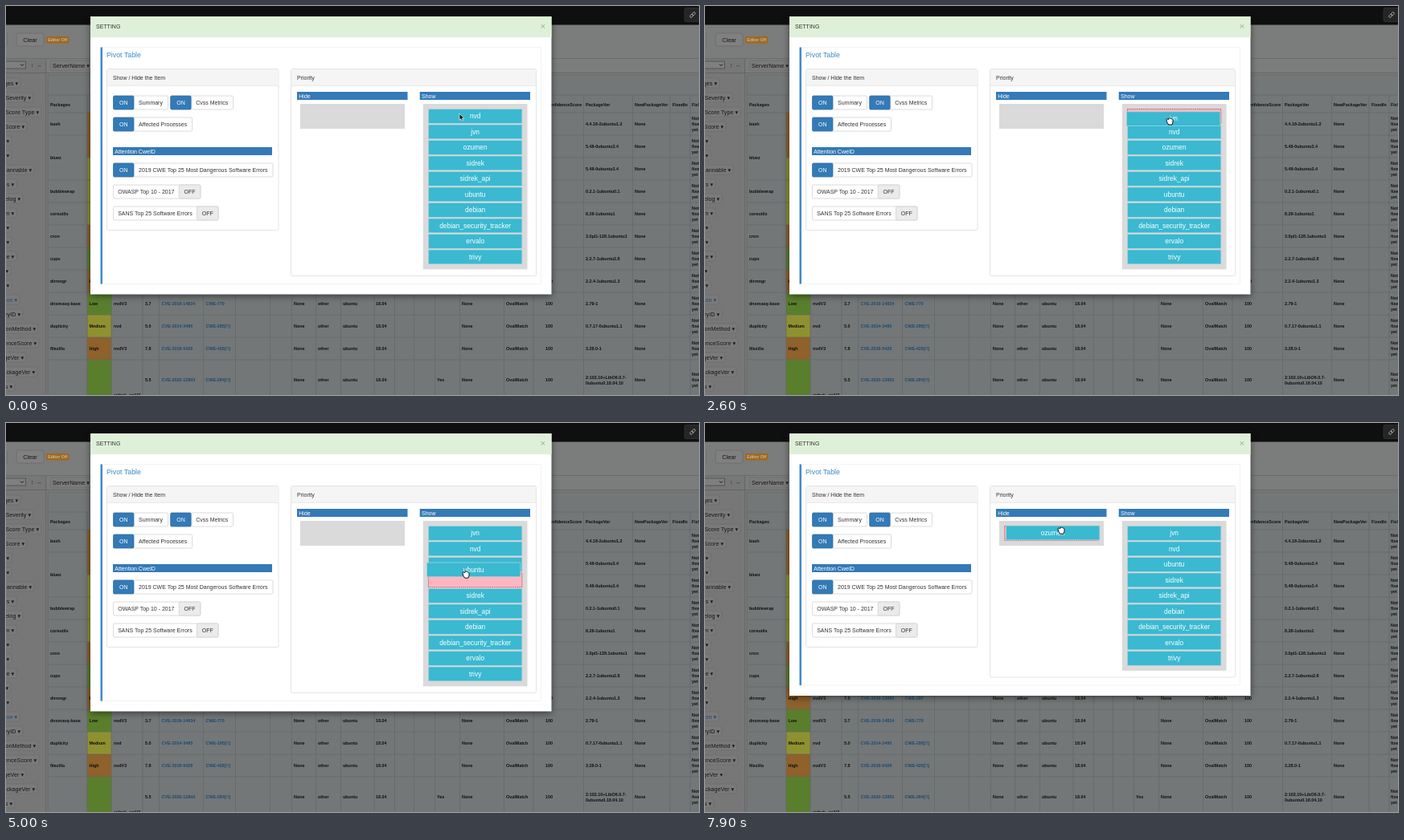
Write an HTML page that moves like this. It is 862 by 485 pixels and loops after 8000 ms.

```html
<!DOCTYPE html>
<html lang="en">
<head>
<meta charset="utf-8">
<title>Priority settings</title>
<style>
  html, body { margin: 0; width: 100%; height: 100%; overflow: hidden; background: #7f7f7f; }
  svg { display: block; width: 862px; height: 485px; font-family: "Liberation Sans", Arial, sans-serif; }
  text { white-space: pre; }
  .dialog { filter: drop-shadow(0 2px 4px rgba(0, 0, 0, .5)); }
</style>
</head>
<body>
<svg id="stage" viewBox="0 0 862 485"></svg>
<script>
const stage = document.getElementById('stage');
const BLUE = '#337ab7';

function add(parent, tag, attrs, content) {
  const el = document.createElementNS('http://www.w3.org/2000/svg', tag);
  for (const key in attrs) el.setAttribute(key, attrs[key]);
  if (content !== undefined) el.textContent = content;
  parent.appendChild(el);
  return el;
}
const group = parent => add(parent, 'g', {});
const box = (parent, x, y, right, bottom, fill, more) =>
  add(parent, 'rect', { x, y, width: right - x, height: bottom - y, fill, ...more });
const label = (parent, x, y, string, size = 7, fill = '#333', more) =>
  add(parent, 'text', { x, y, 'font-size': size, fill, ...more }, string);
const line = (parent, d, stroke, width = 0.7) =>
  add(parent, 'path', { d, stroke, 'stroke-width': width, fill: 'none' });
const thin = stroke => ({ stroke, 'stroke-width': 0.7 });

// Dimmed page behind the dialog
const page = group(stage);
const LOW = '#5a7f2c', MEDIUM = '#8f9130', HIGH = '#8f612b';

function drawToolbar() {
  box(page, 0, 0, 862, 485, '#7b7c7c');
  box(page, 0, 0, 862, 23.5, '#0f0f0f');
  box(page, 844, 2.5, 866, 19.5, '#252525', { rx: 2, ...thin('#383838') });
  const link = add(page, 'g', { transform: 'translate(854 11) rotate(-45)' });
  for (const x of [-4, -0.5])
    box(link, x, -1.5, x + 4.5, 1.5, 'none', { rx: 1.5, stroke: '#aaa', 'stroke-width': 0.9 });
  line(page, 'M0 65.5H862', '#666');
  box(page, -4, 34, 1.5, 50, '#808080', { rx: 2, ...thin('#696969') });
  box(page, 13, 34, 47, 50, '#808080', { rx: 2, ...thin('#696969') });
  label(page, 30, 44.8, 'Clear', 7.3, '#151515', { 'text-anchor': 'middle' });
  box(page, 50, 38, 78.5, 46.5, '#a1691f', { rx: 1.5 });
  label(page, 64.2, 44.2, 'Editor Off', 5.2, '#c5b89f', { 'text-anchor': 'middle', 'font-weight': 'bold' });
}

function pill(right, y, string, fill = '#181818') {
  box(page, -8, y - 6, right + 3, y + 6, '#7a7a7a', { rx: 2.5, ...thin('#6c6c6c') });
  label(page, right, y + 2.5, string + ' ▾', 7.2, fill, { 'text-anchor': 'end' });
}

function drawFields() {
  box(page, 0, 66, 49.5, 485, '#777');
  line(page, 'M49.7 66V485M0 83.5H862', '#5c5c5c');
  box(page, -5, 69, 24.5, 78, '#7f7f7f', thin('#444'));
  line(page, 'M18 72.5l2 2 2-2', '#111', 1);
  label(page, 31, 76, '↕', 7, '#333');
  label(page, 38, 76, '↔', 7, '#333');
  box(page, 55, 68, 106, 81, '#7a7a7a', { rx: 2.5, ...thin('#6c6c6c') });
  label(page, 58, 77.3, 'ServerName ▾', 7.2, '#181818');
  const fields = [['ges', 15], ['Severity', 31], ['Score Type', 41], ['Score', 23], ['', 4], ['', 4],
    ['annable', 32], ['s', 10], ['elog', 18], ['m', 10], ['', 4], ['', 4], ['e', 10], ['', 3], ['', 4],
    ['ion', 14], ['ryID', 18], ['onMethod', 37], ['denceScore', 38], ['geVer', 22], ['ackageVer', 36], ['s', 8]];
  fields.forEach(([name, right], i) => pill(right, 96 + i * 18, name, name === 'ion' ? '#1d4a73' : undefined));
}

function drawTable() {
  const cell = (x, y, string, fill = '#111') => label(page, x, y + 2, string, 5.4, fill, { 'font-weight': 'bold' });
  box(page, 52, 86, 862, 485, '#737777');
  const rows = [
    ['bash', '4.4.18-2ubuntu1.2', HIGH], ['bluez', '5.48-0ubuntu3.4', HIGH], ['', '5.48-0ubuntu3.4', MEDIUM],
    ['bubblewrap', '0.2.1-1ubuntu0.1', MEDIUM], ['coreutils', '8.28-1ubuntu1', MEDIUM],
    ['cron', '3.0pl1-128.1ubuntu1', HIGH], ['cups', '2.2.7-1ubuntu2.8', LOW],
    ['dirmngr', '2.2.4-1ubuntu1.3', HIGH, 'High', 'nvdV3', '7.5', '2019-13050', '297', 'Yes'],
    ['dnsmasq-base', '2.79-1', LOW, 'Low', 'nvdV3', '3.7', '2019-14834', '770'],
    ['duplicity', '0.7.17-0ubuntu1.1', MEDIUM, 'Medium', 'nvd', '5.0', '2014-3495', '295[!!]'],
    ['filezilla', '3.28.0-1', HIGH, 'High', 'nvdV3', '7.8', '2019-5429', '426[!!]'],
    ['', '2:102.10+LibO6.0.7-', LOW, '', '', '5.5', '2020-12803', '284[!!]', 'Yes']
  ];
  let grid = 'M52 86H862M52 111H862M52 133H862';
  rows.forEach(([name, version, colour, severity, type, score, cve, cwe, flag], i) => {
    const top = 133 + i * 28, last = i === rows.length - 1;
    const y = last ? 466 : top + 14;
    box(page, 101, top, 131, last ? 491 : top + 28, colour);
    grid += `M${i === 1 ? 101 : 52} ${top + 28}H862`.repeat(last ? 0 : 1);
    cell(55, i === 1 ? 189 : y, name);
    cell(721, last ? 462.5 : y, version);
    if (last) cell(721, 470, '0ubuntu0.18.04.10');
    cell(782, y, 'None');
    ['Not', 'fixed', 'yet'].forEach((word, k) => cell(853, y - 7 + k * 7, word));
    if (!cve) return;
    cell(103.5, y, severity);
    cell(134, y, type);
    cell(173, y, score);
    cell(193.5, y, 'CVE-' + cve, '#1d4a73');
    cell(248.5, y, 'CWE-' + cwe, '#1d4a73');
    [[358, 'None'], [388, 'other'], [419, 'ubuntu'], [460, '18.04'], [536, flag || ''],
      [567, 'None'], [622, 'OvalMatch'], [671, '100']].forEach(([x, s]) => cell(x, y, s));
  });
  cell(134, 485, 'sidrek_apiV3');
  [[55, 'Packages'], [672, 'ConfidenceScore'], [721, 'PackageVer'], [782, 'NewPackageVer'],
    [829, 'FixedIn'], [853, 'FixState']].forEach(([x, s]) => cell(x, 122.5, s));
  grid += 'M52 86V485';
  for (const x of [101, 131, 170, 190.5, 245.5, 285.5, 328.5, 355.5, 385.5, 416.5, 458, 483.5, 507.5,
    533.5, 564.5, 619.5, 656, 718.5, 779.5, 826, 851]) grid += `M${x} 111V485`;
  line(page, grid, '#626666');
}

// Dialog
const PITCH = 19.5;
const shrinking = [];
const dialog = group(stage);
const tall = (...args) => {
  const el = box(dialog, ...args);
  shrinking.push([el, +el.getAttribute('height')]);
  return el;
};

function toggle(x, y, name, right, on) {
  const split = on ? x + 25.5 : right - 26.5;
  box(dialog, x, y, right, y + 17, '#fff', { rx: 1.5, ...thin('#ccc') });
  box(dialog, on ? x : split, y, on ? split : right, y + 17, on ? BLUE : '#ebebeb',
    { rx: 1.5, ...thin(on ? '#2e6da4' : '#ccc') });
  label(dialog, on ? x + 12.8 : split + 13.3, y + 11, on ? 'ON' : 'OFF', 7, on ? '#fff' : '#333',
    { 'text-anchor': 'middle' });
  label(dialog, on ? x + 31.5 : x + 5.7, y + 11, name);
}

function strip(x, y, right, name) {
  box(dialog, x, y, right, y + 10, BLUE);
  label(dialog, x + 2.3, y + 7.6, name, 7, '#fff');
}

function drawDialog() {
  tall(105, 13, 678.5, 359.5, '#fff', { class: 'dialog' });
  box(dialog, 105, 13, 678.5, 39, '#dff0d8');
  label(dialog, 112, 28, 'SETTING');
  label(dialog, 664.5, 28.6, '×', 11.5, '#a3ad9f');
  tall(118, 51.5, 665.5, 346.5, '#fff', thin('#eee'));
  tall(117.5, 51.5, 120, 346.5, '#428bca');
  label(dialog, 125, 64, 'Pivot Table', 8.8, '#3a8ac8');

  box(dialog, 125.5, 78.5, 339, 279.5, '#fff', { rx: 2, ...thin('#d8d8d8') });
  tall(354.5, 78.5, 659.5, 336.5, '#fff', { rx: 2, ...thin('#d8d8d8') });
  box(dialog, 126, 79, 338.7, 99, '#f5f5f5');
  box(dialog, 355, 79, 659.2, 99, '#f5f5f5');
  line(dialog, 'M125.5 99.3H339M354.5 99.3H659.5', '#ddd');
  label(dialog, 133, 91.6, 'Show / Hide the Item');
  label(dialog, 362, 91.6, 'Priority');

  toggle(133.5, 112, 'Summary', 201.5, true);
  toggle(204.7, 112, 'Cvss Metrics', 282.5, true);
  toggle(133.5, 139, 'Affected Processes', 231.5, true);
  strip(133, 176, 331, 'Attention CweID');
  toggle(133.5, 196, '2019 CWE Top 25 Most Dangerous Software Errors', 332, true);
  toggle(133.5, 223, 'OWASP Top 10 - 2017', 241.8, false);
  toggle(133.5, 250, 'SANS Top 25 Software Errors', 264, false);
  strip(362, 107, 499.5, 'Hide');
  strip(514.7, 107, 652, 'Show');
  box(dialog, 366, 122, 496, 153, '#dadada');
  tall(518.8, 122, 648.5, 328.3, '#dadada');
}

drawToolbar();
drawFields();
drawTable();
drawDialog();

// Sortable list
const NAMES = ['nvd', 'jvn', 'ozumen', 'sidrek', 'sidrek_api', 'ubuntu', 'debian',
  'debian_security_tracker', 'ervalo', 'trivy'];
const HIDE = -1;
const list = group(stage);
const hole = box(list, 0, 0, 116.5, 17.8, '#ffb6c1',
  { stroke: '#b8323c', 'stroke-width': 0.8, 'stroke-dasharray': '1.4 1' });
const items = {};
for (const name of NAMES) {
  const g = items[name] = group(list);
  box(g, 0, 0, 116.5, 17.8, '#3ab9d1', thin('#b5d3d9'));
  label(g, 58.25, 11.6, name, 8.4, '#fff', { 'text-anchor': 'middle' });
}

// Each drag: time span, grab point, and slot changes as [time, slot]
const DRAGS = [
  { name: 'jvn', from: 1500, to: 3000, grab: [579, 160], slots: [[2400, 0]] },
  { name: 'ubuntu', from: 4500, to: 5800, grab: [574, 241], slots: [[4700, 4], [4900, 3], [5400, 2]] },
  { name: 'ozumen', from: 7100, to: 8000, grab: [594, 193], slots: [[7500, HIDE]] }
];

// Pointer runs: first step, last step, end point
const START = [567, 138];
const RUNS = [
  [100, 800, 580, 174], [1200, 1300, 579, 160], [1500, 2100, 578, 150], [2200, 2300, 578, 148],
  [2400, 2800, 578, 141], [3000, 3200, 577, 211], [3300, 3300, 575, 259], [3400, 3400, 575, 245],
  [3600, 3700, 576, 259], [3900, 4000, 575, 242], [4200, 4200, 574, 237], [4300, 4300, 574, 241],
  [4500, 5000, 572, 189], [5100, 5300, 572, 182], [5400, 5400, 572, 183], [5700, 5700, 572, 181],
  [6000, 6000, 572, 194], [6200, 6400, 580, 222], [6500, 6700, 551, 180], [6800, 6900, 571, 194],
  [7000, 7000, 594, 193], [7100, 7300, 523, 144], [7500, 7600, 467, 132], [7800, 7900, 443, 134]
];

const arrow = add(stage, 'path', {
  d: 'M-3-4V4.2L-1.2 2.6 0 5.2 1.4 4.6 .3 2.1H2.7Z', fill: '#111', stroke: '#fff', 'stroke-width': 0.7
});
const hand = add(stage, 'path', {
  d: 'M-3.9-1.6Q-4.3-3-3-3.2L-1.3-2.2Q-1.2-4.3 0-4.1 .9-4.3 1.3-3.4 2.4-3.9 2.8-2.7 4-2.8 4 -1.4V1.2L3 4.2H-1.3L-3.4 1Z',
  fill: '#fff', stroke: '#111', 'stroke-width': 1, 'stroke-linejoin': 'round'
});

const place = (el, x, y) => el.setAttribute('transform', `translate(${x} ${y})`);
const slotAt = slot => slot === HIDE ? [372.7, 128.5] : [525.4, 128.5 + slot * PITCH];

function pointerAt(t) {
  let [x, y] = START;
  for (const [from, to, endX, endY] of RUNS) {
    if (t < from) break;
    const part = Math.min(1, (t - from + 100) / (to - from + 100));
    x += (endX - x) * part;
    y += (endY - y) * part;
  }
  return [x, y];
}

function render(t) {
  const [px, py] = pointerAt(t);
  const order = [...NAMES];
  const spots = {};
  let hidden = null, active = null, origin;

  for (const drag of DRAGS) {
    if (t < drag.from) break;
    if (t < drag.to) {
      active = drag;
      origin = slotAt(order.indexOf(drag.name));
    }
    for (const [time, slot] of drag.slots) {
      if (t < time) break;
      order.splice(order.indexOf(drag.name), 1);
      if (slot === HIDE) hidden = drag.name;
      else order.splice(slot, 0, drag.name);
    }
  }
  order.forEach((name, slot) => { spots[name] = slotAt(slot); });
  if (hidden) spots[hidden] = slotAt(HIDE);

  hole.style.display = active ? '' : 'none';
  if (active) {
    const { name, grab } = active;
    place(hole, ...spots[name]);
    spots[name] = [origin[0] + px - grab[0], origin[1] + py - grab[1]];
    if (list.lastChild !== items[name]) list.appendChild(items[name]);
  }
  for (const name of NAMES) place(items[name], ...spots[name]);
  for (const [el, height] of shrinking) el.setAttribute('height', height - (hidden ? PITCH : 0));

  const resting = t < 100;
  arrow.style.display = resting ? '' : 'none';
  hand.style.display = resting ? 'none' : '';
  place(resting ? arrow : hand, px, py);
}

const begin = performance.now();
function tick() {
  const t = (performance.now() - begin) % 8000;
  render(Math.floor(t / 100) * 100);
  requestAnimationFrame(tick);
}
tick();
</script>
</body>
</html>
```
